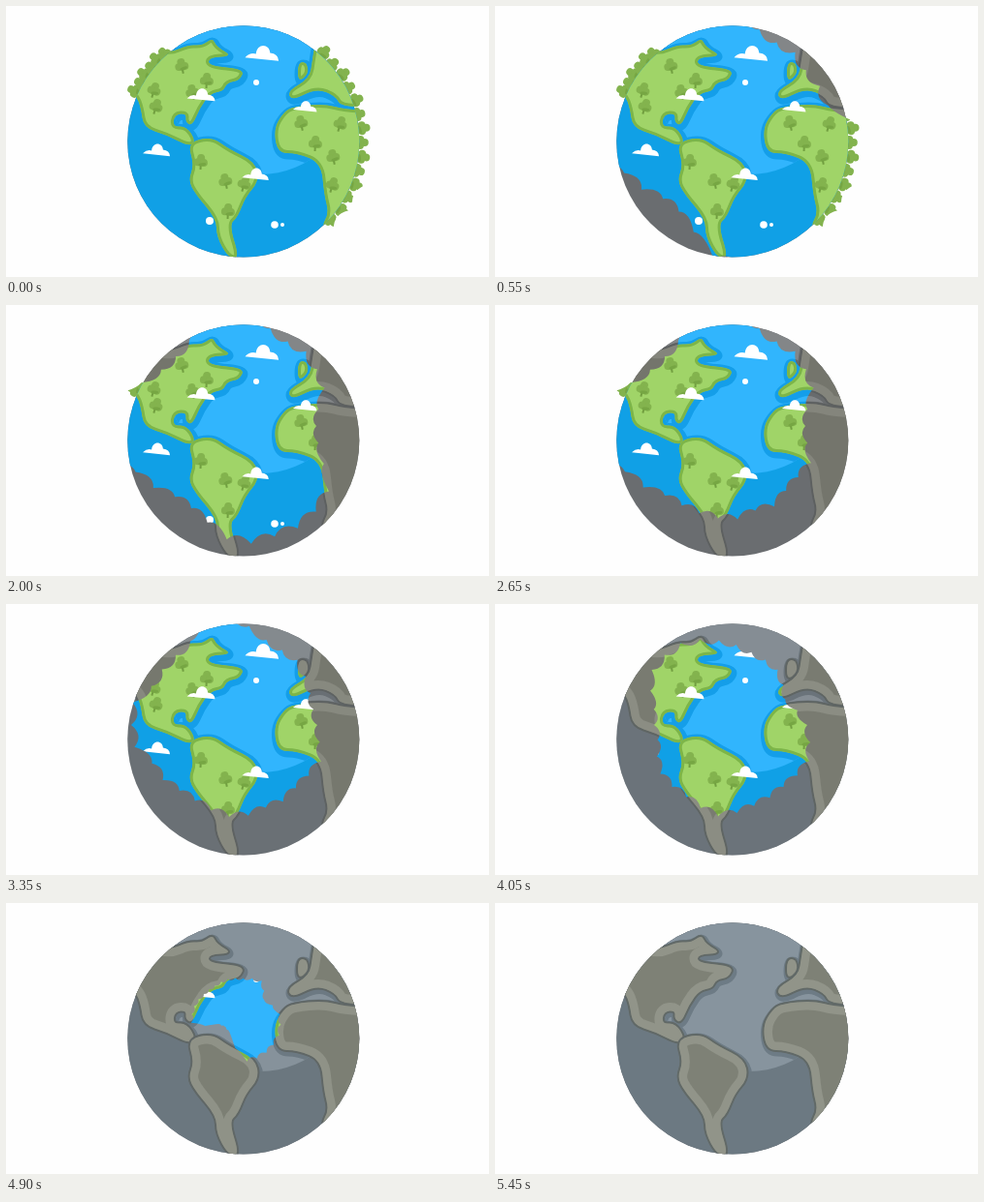
Write an HTML page with a canvas that moves like this. It is 498 by 280 pixels and loops after 5.5 s.

```html
<!DOCTYPE html>
<html lang="en">
<head>
<meta charset="utf-8">
<title>Fading globe</title>
<style>
  html, body { margin: 0; width: 100%; height: 100%; overflow: hidden; background: #fefefe; }
  canvas { display: block; width: 498px; height: 280px; }
</style>
</head>
<body>
<canvas id="stage" width="498" height="280"></canvas>
<script>
const W = 498, H = 280, LOOP = 5500, STEP = 50, TAU = Math.PI * 2;
const GLOBE = { x: 244.8, y: 140, r: 119.5 };

const lerp = (a, b, p) => a + (b - a) * p;
const clamp = v => Math.max(0, Math.min(1, v));

function smoothPath(list) {
  const path = new Path2D(), n = list.length;
  const mid = (i, k) => (list[(i + k) % n] + list[(i + k + 2) % n]) / 2;
  path.moveTo(mid(0, 0), mid(0, 1));
  for (let i = 2; i <= n; i += 2) {
    path.quadraticCurveTo(list[i % n], list[(i + 1) % n], mid(i, 0), mid(i, 1));
  }
  path.closePath();
  return path;
}

// Coastlines as x,y pairs; points outside the globe are clipped at its rim.
const northAmerica = smoothPath([110,70, 140,40, 168,49, 188,40, 202,41, 213,33, 217,42, 234,52, 209,53,
  209,62, 246,65, 241,77, 228,79, 224,88, 211,90, 200,105, 192,124, 185,120, 186,111, 174,112, 172,125,
  186,124, 196,140, 188,145, 165,133, 142,126, 139,105, 134,92]);
const southAmerica = smoothPath([187,141, 212,135, 230,148, 257,161, 261,181, 247,197, 239,218, 230,226,
  241,261, 229,260, 217,238, 217,220, 195,194, 188,180, 194,164]);
const europe = smoothPath([320,30, 316,55, 313,75, 290,88, 295,98, 320,85, 340,93, 345,104, 385,104, 375,50]);
const africa = smoothPath([296,104, 328,101, 350,107, 385,108, 385,215, 335,245, 325,228, 333,214, 328,195,
  325,162, 300,152, 280,152, 276,127, 286,110]);
const island = smoothPath([301,58, 310,58, 312,70, 301,79]);
const landPaths = [northAmerica, southAmerica, europe, africa, island];

const INLAND_TREES = [181,61, 153,86, 207,76, 192,88, 155,103, 201,160, 226,180, 246,183, 229,211,
  304,120, 345,121, 319,141, 337,155, 337,184];
const RIM_TREES = [{ from: 205, to: 228, count: 6 }, { from: -48, to: 42, count: 14 }];
const CLOUDS = [[265, 49, 1.2], [202, 92, 1], [309, 104, .85], [156, 149, .97], [258, 174, .95]];
const DROPS = [[258, 79, 3], [210, 222, 4], [277, 226, 3.8], [285, 226, 2]];

const ALIVE = { sea: '#10a0e6', shallow: '#31b5fd', ring: '#149ee9', land: '#a0d468', edge: '#7db548', edgeWidth: 6 };
const DULL = { sea: '#6a6d70', shallow: '#838688', ring: '#686b6d', land: '#74756c', edge: '#84857c', edgeWidth: 17, coast: '#5d6060' };
const DEAD = { sea: '#6c7982', shallow: '#87949e', ring: '#6d7b85', land: '#7e8176', edge: '#919489', edgeWidth: 17, coast: '#616967' };

// Extent of the living area around CORE, one radius every 12 degrees clockwise from the right.
const CORE = { x: 240, y: 125 }, LAST = { x: 221, y: 99 }, FULL = 146, RAYS = 30;

function patch(base, start, ...radii) {
  const result = [...base];
  radii.forEach((r, i) => result[(start + i) % RAYS] = r);
  return result;
}
const halfway = radii => radii.flatMap((r, i) => [r, (r + radii[(i + 1) % radii.length]) / 2]);

const untouched = Array(RAYS).fill(FULL);
const southWest = patch(untouched, 8, 138, 114, 101, 100, 110, 117);
const corners = patch(southWest, 23, 122, 106, 101, 104, 100, 104, 106);
const northWest = patch(corners, 17, 110, 99, 97, 102);
const east = patch(northWest, 28, 97, 84, 80, 84, 98, 138);
const south = patch(east, 2, 94, 90, 90, 96, 92, 97, 96, 95, 95, 97, 108, 116);
const STAGES = [
  { t: 0, r: untouched },
  { t: 550, r: corners },
  { t: 1400, r: east },
  { t: 2650, r: south },
  { t: 4050, r: halfway([82, 92, 86, 88, 95, 86, 86, 74, 78, 97, 98, 88, 79, 77, 65]) },
  { t: 4550, r: halfway([82, 88, 88, 84, 31, 24, 28, 70, 65, 58, 56, 60, 64, 76, 60]) },
  { t: 5450, r: Array(RAYS).fill(0) }
];

function makeLayer(draw) {
  const layer = document.createElement('canvas');
  layer.width = W;
  layer.height = H;
  draw(layer.getContext('2d'));
  return layer;
}

function circle(c, x, y, r) {
  c.beginPath();
  c.arc(x, y, r, 0, TAU);
}

function drawGlobe(c, colors) {
  c.save();
  circle(c, GLOBE.x, GLOBE.y, GLOBE.r);
  c.clip();
  c.fillStyle = colors.sea;
  c.fillRect(0, 0, W, H);
  c.lineJoin = 'round';

  c.save();
  circle(c, 262, 79, 95);
  c.clip();
  c.fillStyle = colors.shallow;
  c.fillRect(0, 0, W, H);
  c.translate(1, 2);
  c.strokeStyle = colors.ring;
  c.lineWidth = 9;
  landPaths.forEach(path => c.stroke(path));
  c.restore();

  for (const path of landPaths) {
    if (colors.coast) {
      c.strokeStyle = colors.coast;
      c.lineWidth = 4;
      c.stroke(path);
    }
    c.save();
    c.clip(path);
    c.fillStyle = colors.land;
    c.fill(path);
    c.strokeStyle = colors.edge;
    c.lineWidth = colors.edgeWidth;
    c.stroke(path);
    c.restore();
  }
  c.restore();
}

function drawTree(c, x, y, angle) {
  c.save();
  c.translate(x, y);
  c.rotate(angle);
  c.fillStyle = '#719f40';
  c.fillRect(-1, 2, 2, 7);
  c.fillStyle = '#83b34e';
  for (const [dx, dy] of [[0, -3], [-3, 1.5], [3, 1.8]]) {
    circle(c, dx, dy, 4);
    c.fill();
  }
  c.fillStyle = '#76a643';
  c.beginPath();
  c.ellipse(1.5, 3.8, 4, 1.6, -.2, 0, TAU);
  c.fill();
  c.restore();
}

function drawCloud(c, x, y, size) {
  c.save();
  c.translate(x, y);
  c.rotate(.1);
  c.scale(size, size);
  c.beginPath();
  c.moveTo(-15, 5);
  c.quadraticCurveTo(-11, 0, -6, 1);
  c.bezierCurveTo(-6, -9, 5, -9, 6, -1);
  c.quadraticCurveTo(13, -1, 14, 5);
  c.closePath();
  c.fill();
  c.restore();
}

const alive = makeLayer(c => {
  for (const { from, to, count } of RIM_TREES) {
    for (let i = 0; i < count; i++) {
      const angle = lerp(from, to, i / (count - 1)) * TAU / 360;
      const r = GLOBE.r + (i % 2 ? 2.5 : 5);
      drawTree(c, GLOBE.x + r * Math.cos(angle), GLOBE.y + r * Math.sin(angle), angle + TAU / 4);
    }
  }
  drawGlobe(c, ALIVE);
  for (let i = 0; i < INLAND_TREES.length; i += 2) {
    drawTree(c, INLAND_TREES[i], INLAND_TREES[i + 1], i % 3 * .25 - .2);
  }
  c.fillStyle = '#fff';
  CLOUDS.forEach(cloud => drawCloud(c, ...cloud));
  for (const drop of DROPS) {
    circle(c, ...drop);
    c.fill();
  }
});
const dull = makeLayer(c => drawGlobe(c, DULL));
const dead = makeLayer(c => drawGlobe(c, DEAD));

// Traces the living area: pointed cusps joined by inward scallops.
function traceLiving(c, t) {
  let k = 0;
  while (k < STAGES.length - 2 && t >= STAGES[k + 1].t) k++;
  const from = STAGES[k], to = STAGES[k + 1];
  const p = clamp((t - from.t) / (to.t - from.t));
  const shift = k === STAGES.length - 2 ? p : 0;
  const cx = lerp(CORE.x, LAST.x, shift), cy = lerp(CORE.y, LAST.y, shift);
  const radius = i => lerp(from.r[i % RAYS], to.r[i % RAYS], p);
  const point = (i, r) => [cx + r * Math.cos(i / RAYS * TAU), cy + r * Math.sin(i / RAYS * TAU)];
  c.beginPath();
  c.moveTo(...point(0, radius(0)));
  for (let i = 0; i < RAYS; i++) {
    const dip = (radius(i) + radius(i + 1)) / 2 * .89;
    c.quadraticCurveTo(...point(i + .5, dip), ...point(i + 1, radius(i + 1)));
  }
  c.closePath();
}

const ctx = document.getElementById('stage').getContext('2d');

function render(t) {
  ctx.fillStyle = '#fefefe';
  ctx.fillRect(0, 0, W, H);
  // The rim is anti-aliased once, so the grey globe stays hidden until it is uncovered.
  ctx.drawImage(dull, 0, 0);
  ctx.globalAlpha = clamp((t - 2600) / 2600);
  ctx.drawImage(dead, 0, 0);
  ctx.globalAlpha = 1;
  ctx.save();
  traceLiving(ctx, t);
  ctx.clip();
  ctx.drawImage(alive, 0, 0);
  ctx.restore();
}

function tick() {
  render(Math.floor(performance.now() % LOOP / STEP) * STEP);
  requestAnimationFrame(tick);
}
tick();
</script>
</body>
</html>
```
